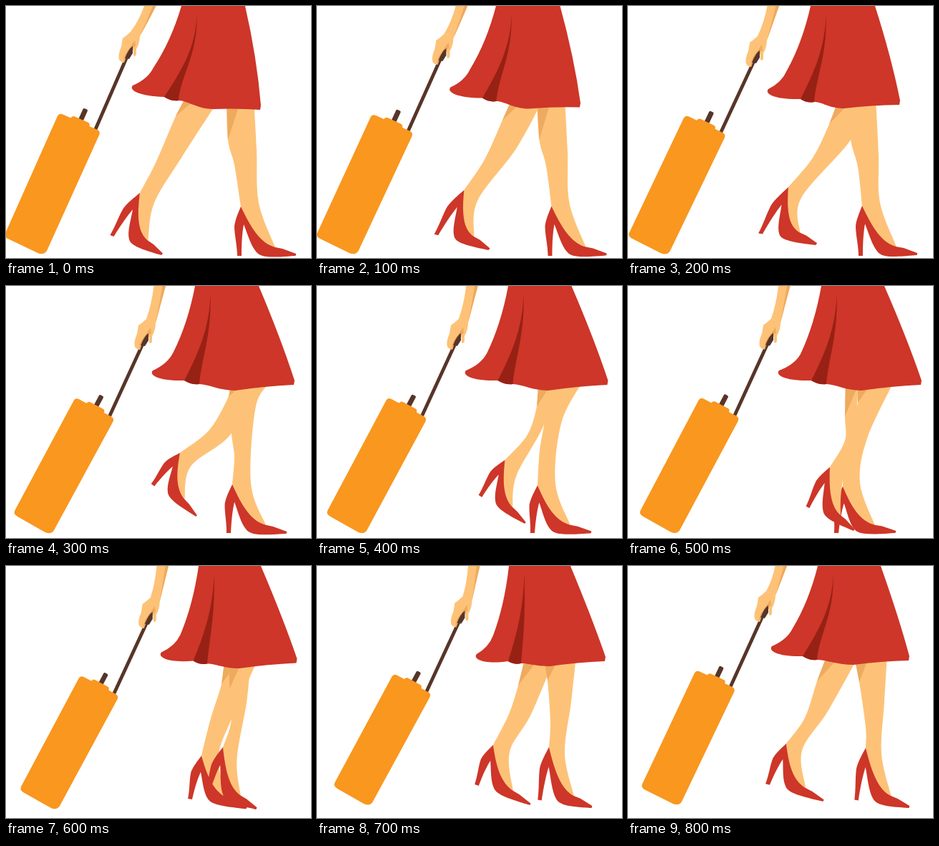
An HTML page with a canvas for the animation above (900 ms loop, 426 by 352 pixels).

```html
<!DOCTYPE html>
<html lang="en">
<head>
<meta charset="utf-8">
<title>Walking with a suitcase</title>
<style>
html, body { margin: 0; width: 100%; height: 100%; overflow: hidden; background: #fff; }
canvas { display: block; }
</style>
</head>
<body>
<canvas id="stage" width="426" height="352"></canvas>
<script>
const ctx = document.getElementById('stage').getContext('2d');
const RED = '#cd3628', DARK_RED = '#972114', SKIN = '#fdc277', SHADE = '#eeaa5f',
      ORANGE = '#f9971f', BROWN = '#573529';
const STEP_MS = 100, STEPS = 9;
const KEY_STEPS = [0, 2, 3, 5, 7, 8];

// Leg poses: back edge (hip, thigh, calf), front edge (hip, knee, ankle),
// then the shoe (top of heel, spike tip, toe).
const stance = [
  [308,128, 310,187, 319,222, 346,128, 350,200, 353,275, 328,280, 326,349, 404,348],
  [306,128, 311,187, 321,225, 346,128, 350,208, 352,275, 327,279, 325,349, 403,347],
  [312,132, 315,205, 319,238, 372,132, 349,168, 342,275, 316,277, 311,345, 391,345],
  [320,134, 321,163, 303,222, 372,132, 334,213, 324,275, 300,280, 291,345, 373,344],
  [291,126, 281,167, 268,207, 332,128, 299,207, 269,260, 246,250, 223,306, 297,333],
  [279,122, 264,161, 247,212, 322,126, 279,203, 243,258, 221,248, 195,305, 272,328]
];
const swing = [
  [254,122, 237,154, 210,217, 298,130, 245,212, 207,275, 187,261, 148,321, 217,347],
  [295,128, 281,165, 258,212, 334,130, 311,187, 242,268, 224,253, 185,318, 262,333],
  [315,134, 311,154, 284,201, 350,134, 314,207, 258,252, 243,233, 205,278, 265,321],
  [304,130, 303,182, 303,216, 321,132, 318,185, 299,278, 282,253, 251,309, 315,341],
  [317,128, 322,160, 326,218, 362,126, 355,190, 346,262, 324,253, 311,327, 383,337],
  [316,126, 323,162, 332,225, 362,124, 358,190, 354,262, 332,254, 319,327, 392,337]
];
// Skirt: left waist x, flare, left tip, fold start, fold end, belly, right tip, right waist x.
const skirts = [
  [245, 206,86, 177,111, 221,127, 241,132, 290,144, 355,145, 334],
  [255, 222,90, 196,116, 241,130, 260,134, 302,143, 379,138, 345],
  [264, 234,92, 205,118, 249,132, 270,137, 320,146, 402,138, 353],
  [270, 241,95, 211,118, 256,132, 277,137, 326,146, 409,138, 358],
  [268, 246,97, 223,123, 267,133, 285,136, 326,140, 402,133, 354],
  [265, 230,87, 201,112, 244,126, 264,131, 315,138, 392,132, 353]
];
// Suitcase x, y, tilt in degrees, scale; hand shift x, y; x of the arm at the top edge.
const luggage = [
  [74, 149, 24, 1, 0, 0, 193],
  [80, 152, 25.4, .99, 7, 6, 194.5],
  [97, 155.5, 28.2, .974, 22, 10, 206.5],
  [101, 155, 27.8, .974, 26, 9.5, 210],
  [107, 150, 28.3, .942, 29.5, 6.5, 211],
  [95, 145, 25.2, .958, 19, -1, 205.5]
];

const caseShape = new Path2D('M6 0H18Q19-4 22-4H43Q46-4 46.5 0H58Q64 0 64 6L63 183Q62 191 52 191L8 190Q0 190 0 184V6Q0 0 6 0Z');
const knobShape = new Path2D('M28.5-2V-18Q28.5-20 30.5-20H33.5Q35.5-20 35.5-18V-2Z');
const handShape = new Path2D('M174 36Q168 42 163 45L161 57Q156 68 158 75Q161 79 165 79L167 71L175 58L178 62V69Q181 72 182 67V60Q187 52 187 41Z');
const palmShade = new Path2D('M165 79Q163 73 168 65L180 48L181 56Q172 60 165 79Z');
const gripShape = new Path2D('M166 73L172 74L177 66V56Q171 60 166 73Z');
// Unit axes: x runs from heel top to toe, y from heel top to spike tip.
const shoeShape = new Path2D(`M0 0C-.048 .192-.096 .37-.105 .509C-.1 .679-.044 .84-.038 1.038
  L.038 .962C.031 .694 .039 .483 .061 .302C.143 .439 .2 .6 .306 .626
  C.386 .649 .54 .511 .988 .026Q1.02 0 1.012-.041L.766 .1L.637 .198C.378 .381 .191 .247 0 0Z`);

const mixPose = (a, b, t) => a.map((v, i) => v + (b[i] - v) * t);

function poseAt(keys, step, next) {
  let i = KEY_STEPS.length - 1;
  while (KEY_STEPS[i] > step) i--;
  const last = i === KEY_STEPS.length - 1;
  const end = last ? STEPS : KEY_STEPS[i + 1];
  const t = (step - KEY_STEPS[i]) / (end - KEY_STEPS[i]);
  return mixPose(keys[i], last ? next[0] : keys[i + 1], t);
}

const pairs = list => Array.from({ length: list.length / 2 }, (_, i) => [list[2 * i], list[2 * i + 1]]);

function fill(color, path) {
  ctx.fillStyle = color;
  if (path) ctx.fill(path); else ctx.fill();
}

// Smooth curve through the points, joined to the current path.
function spline(points) {
  ctx.lineTo(...points[0]);
  for (let i = 0; i < points.length - 1; i++) {
    const a = points[i], b = points[i + 1];
    const before = points[i - 1] || a, after = points[i + 2] || b;
    ctx.bezierCurveTo(
      a[0] + (b[0] - before[0]) / 6, a[1] + (b[1] - before[1]) / 6,
      b[0] - (after[0] - a[0]) / 6, b[1] - (after[1] - a[1]) / 6, ...b);
  }
}

function drawLeg(pose) {
  const [hip, thigh, calf, frontHip, knee, ankle, heel, spike, toe] = pairs(pose);
  const inShoe = (u, v) => [0, 1].map(k => heel[k] + u * (toe[k] - heel[k]) + v * (spike[k] - heel[k]));

  ctx.beginPath();
  spline([hip, thigh, calf, heel]);
  ctx.lineTo(...inShoe(.3, .45));
  spline([inShoe(.637, .198), ankle, knee, frontHip]);
  ctx.closePath();
  fill(SKIN);

  ctx.beginPath();
  ctx.moveTo(...hip);
  ctx.lineTo(hip[0] + 21, hip[1]);
  ctx.lineTo(...thigh);
  fill(SHADE);

  ctx.save();
  ctx.transform(toe[0] - heel[0], toe[1] - heel[1], spike[0] - heel[0], spike[1] - heel[1], ...heel);
  fill(RED, shoeShape);
  ctx.restore();
}

function drawSkirt([left, ax, ay, bx, by, fx, fy, gx, gy, hx, hy, rx, ry, right]) {
  ctx.beginPath();
  ctx.moveTo(left, 0);
  ctx.quadraticCurveTo((left + ax) / 2 + 5, ay / 2 + 6, ax, ay);
  ctx.quadraticCurveTo(bx + .72 * (ax - bx), by + .35 * (ay - by), bx, by);
  ctx.bezierCurveTo(bx - 6, by + 7, bx + 10, by + 15, fx, fy);
  ctx.quadraticCurveTo((fx + gx) / 2, (fy + gy) / 2 + 4, gx, gy);
  ctx.bezierCurveTo(gx + 12, gy, hx - 22, hy, hx, hy);
  ctx.quadraticCurveTo((hx + rx) / 2, (hy + ry) / 2 - 2, rx, ry);
  ctx.lineTo(rx + 1, ry - 6);
  ctx.quadraticCurveTo((rx + right) / 2 + 6, 72, right, 0);
  fill(RED);

  const foldX = left + 21.5, foldY = 12;
  ctx.beginPath();
  ctx.moveTo(foldX, foldY);
  ctx.bezierCurveTo(foldX - 1, foldY + 45, fx + (foldX - fx) * .55, fy - 38, fx, fy);
  ctx.quadraticCurveTo((fx + gx) / 2, (fy + gy) / 2 + 4, gx, gy);
  ctx.bezierCurveTo(gx + 3, gy - 35, foldX + 2, foldY + 55, foldX, foldY);
  fill(DARK_RED);
}

function drawLuggage([x, y, degrees, scale, dx, dy, armX]) {
  const angle = degrees * Math.PI / 180;
  const cos = Math.cos(angle) * scale, sin = Math.sin(angle) * scale;

  ctx.beginPath();
  ctx.moveTo(x + 56 * cos - 4 * sin, y + 56 * sin + 4 * cos);
  ctx.lineTo(168.5 + dx, 72 + dy);
  ctx.lineWidth = 4.8;
  ctx.strokeStyle = BROWN;
  ctx.stroke();

  ctx.save();
  ctx.transform(cos, sin, -sin, cos, x, y);
  fill(BROWN, knobShape);
  fill(ORANGE, caseShape);
  ctx.restore();

  const wristX = 187 + dx, wristY = 42 + dy, edgeX = armX + 16.5;
  const midX = (wristX + edgeX) / 2, midY = wristY / 2;
  ctx.beginPath();
  ctx.moveTo(armX, 0);
  ctx.quadraticCurveTo((armX + 174 + dx) / 2 + 2, midY, 174 + dx, 36 + dy);
  ctx.lineTo(wristX, wristY);
  ctx.quadraticCurveTo(midX - 1, midY + 3, edgeX, 0);
  fill(SKIN);

  ctx.save();
  ctx.translate(dx, dy);
  fill(SKIN, handShape);
  fill(SHADE, palmShade);
  fill(BROWN, gripShape);
  ctx.restore();

  ctx.beginPath();
  ctx.moveTo(edgeX, 0);
  ctx.quadraticCurveTo(midX - 1, midY + 3, wristX, wristY);
  ctx.quadraticCurveTo(midX - 2, midY, edgeX - 4.5, 0);
  fill(SHADE);
}

function draw(step) {
  ctx.fillStyle = '#fff';
  ctx.fillRect(0, 0, 426, 352);
  // The legs trade roles at the end of each loop.
  drawLeg(poseAt(stance, step, swing));
  drawLeg(poseAt(swing, step, stance));
  drawSkirt(poseAt(skirts, step, skirts));
  drawLuggage(poseAt(luggage, step, luggage));
}

const start = performance.now();
function tick() {
  draw(Math.floor((performance.now() - start) / STEP_MS) % STEPS);
  requestAnimationFrame(tick);
}
tick();
</script>
</body>
</html>
```
